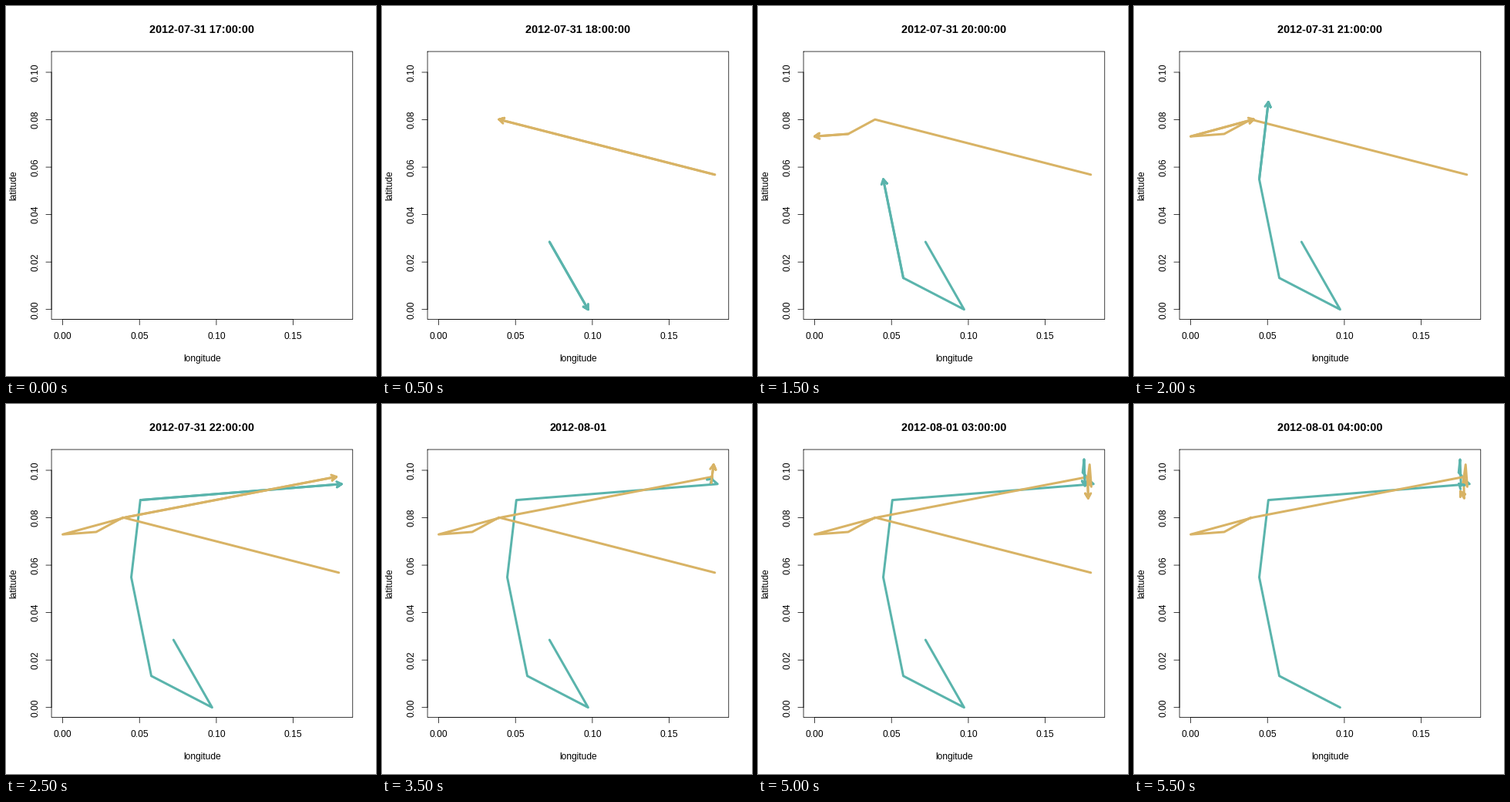
A matplotlib script for the animation above (6000 ms loop, 480 px wide and 480 px high).

```python
import matplotlib.pyplot as plt
import numpy as np
from matplotlib.animation import FuncAnimation

SIZE, DPI = 480, 80
PT = 72 / DPI  # points per pixel
STEPS, INTERVAL, TAIL = 12, 500, 10
LEFT, RIGHT, TOP, BOTTOM = 59.04, 449.76, 59.04, 406.56
CENTER_X, CENTER_Y = (LEFT + RIGHT) / 2, (TOP + BOTTOM) / 2
TEAL, GOLD = "#5AB4AC", "#D8B365"

# Hourly positions in pixels
TEAL_PATH = np.array([
    (217.3, 306.0), (267.4, 393.7), (188.5, 352.8), (162.5, 224.8),
    (174.3, 124.6), (435.3, 103.8), (428.0, 97.5), (428.6, 97.0),
    (421.2, 89.0), (423.0, 71.9), (424.2, 106.0), (421.6, 103.5)])
GOLD_PATH = np.array([
    (431.8, 218.8), (151.8, 147.2), (117.0, 166.0), (73.5, 169.2),
    (155.2, 147.0), (428.6, 94.4), (427.0, 102.5), (430.2, 78.6),
    (432.4, 107.3), (427.6, 97.0), (428.4, 122.2), (423.4, 113.5)])

plt.rcParams["font.family"] = "Liberation Sans"
fig = plt.figure(figsize=(SIZE / DPI, SIZE / DPI), dpi=DPI, facecolor="white")
ax = fig.add_axes([0, 0, 1, 1])
ax.set(xlim=(0, SIZE), ylim=(SIZE, 0))
ax.axis("off")


def stroke(xs, ys, color="black", width=0.75, z=2):
    line, = ax.plot(xs, ys, color=color, lw=width * PT, zorder=z,
                    solid_capstyle="round", solid_joinstyle="round")
    line.set_snap(False)
    return line


def label(x, y, text, size=12, **kw):
    return ax.text(x, y, text, fontsize=size * PT, ha=kw.pop("ha", "center"),
                   va="baseline", **kw)


def side_label(x, y, text):
    ax.text(x, y, text, fontsize=12 * PT, rotation=90, rotation_mode="anchor",
            ha="center", va="baseline")


def lon_x(lon):
    return 73.51 + 1994 * lon


def lat_y(lat):
    return 393.69 - 3077 * lat


def draw_axes():
    stroke([LEFT, RIGHT, RIGHT, LEFT, LEFT], [TOP, TOP, BOTTOM, BOTTOM, TOP])
    lons, lats = np.arange(4) * 0.05, np.arange(6) * 0.02
    stroke(lon_x(lons[[0, -1]]), [BOTTOM, BOTTOM])
    stroke([LEFT, LEFT], lat_y(lats[[0, -1]]))
    for lon in lons:
        x = lon_x(lon)
        stroke([x, x], [BOTTOM, BOTTOM + 7.2])
        label(x, 432, f"{lon:.2f}")
    for lat in lats:
        y = lat_y(lat)
        stroke([LEFT - 7.2, LEFT], [y, y])
        side_label(42, y, f"{lat:.2f}")
    label(CENTER_X, 461, "longitude")
    side_label(13, CENTER_Y, "latitude")


def arrow_points(start, tip, length=7.2, angle=np.pi / 6):
    """Shaft followed by both barbs of an open arrowhead, as one polyline."""
    dx, dy = start - tip
    heading = np.arctan2(dy, dx)
    barbs = [tip + length * np.array([np.cos(a), np.sin(a)])
             for a in (heading - angle, heading + angle)]
    return np.array([start, tip, barbs[0], tip, barbs[1]])


def title_for(step):
    day, hour = divmod(17 + step, 24)
    date = "2012-08-01" if day else "2012-07-31"
    return f"{date} {hour:02d}:00:00" if hour else date


draw_axes()
title = label(CENTER_X, 35, "", size=14.4, weight="bold")
tracks = [(path, stroke([], [], color, 3, 3), stroke([], [], color, 3, 4))
          for path, color in ((TEAL_PATH, TEAL), (GOLD_PATH, GOLD))]


def update(step):
    title.set_text(title_for(step))
    for path, trail, arrow in tracks:
        if step == 0:
            trail.set_data([], [])
            arrow.set_data([], [])
            continue
        trail.set_data(*path[max(0, step - TAIL):step + 1].T)
        arrow.set_data(*arrow_points(path[step - 1], path[step]).T)
    return [title] + [line for _, *lines in tracks for line in lines]


anim = FuncAnimation(fig, update, frames=STEPS, interval=INTERVAL,
                     repeat=True, repeat_delay=0)
plt.show()
```
